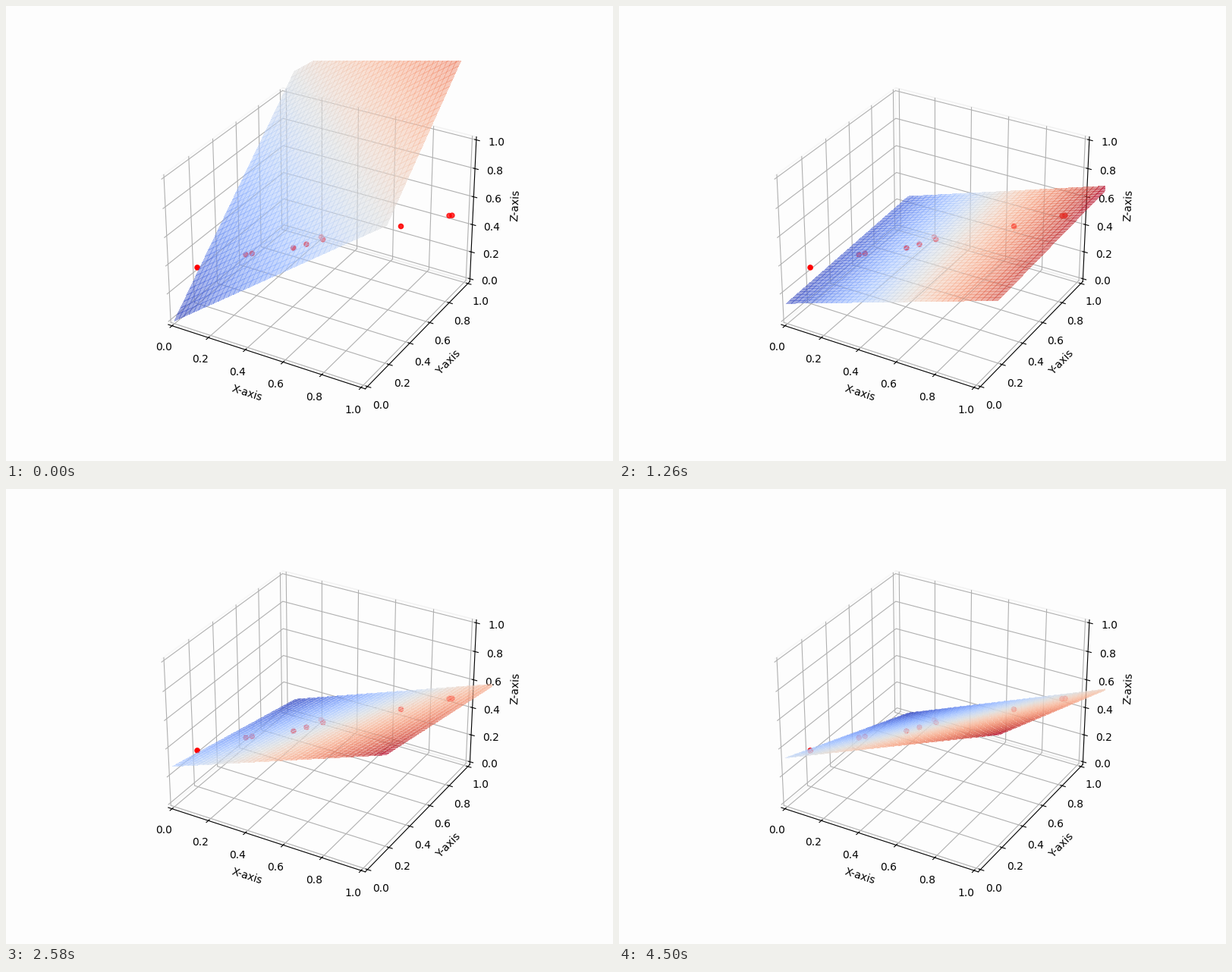
Recreate the animation shown at these times as a matplotlib script. Size 800 by 600 pixels, loop 4530 ms.

```python
import numpy as np
import matplotlib.pyplot as plt
from matplotlib.animation import FuncAnimation
from mpl_toolkits.mplot3d.art3d import Poly3DCollection

FRAMES, INTERVAL = 151, 30
BACKGROUND = "#fdfdfd"
MARGIN = 1 / 48
CELLS = 40
EXTENT = 1.1
ALPHA = 0.5

# Plane coefficients (a, b, c) in z = a*x + b*y + c.
START = np.array([1, 1, 0])
FITTED = np.array([0.584, -0.457, 0.361])
SLOW = np.array([-0.48, 0.942, -0.34])
MEDIUM = np.array([0.76, 0.25, -0.52])
FAST = START - FITTED - SLOW - MEDIUM


def height(x, y, coefs):
    a, b, c = coefs
    return a * x + b * y + c


def plane(step):
    """Gradient descent towards the fit, as three decaying modes."""
    return (FITTED + SLOW * np.exp(-0.0165 * step)
            + MEDIUM * np.exp(-0.05 * step) + FAST * 0.45 ** step)


def grid_cells():
    """Corner x and y of every cell, each of shape (cells, 4)."""
    edges = np.linspace(0, EXTENT, CELLS + 1)
    x, y = np.meshgrid(edges, edges)

    def corners(g):
        quads = (g[:-1, :-1], g[:-1, 1:], g[1:, 1:], g[1:, :-1])
        return np.stack([q.ravel() for q in quads], axis=1)

    return corners(x), corners(y)


cell_x, cell_y = grid_cells()
coolwarm = plt.get_cmap("coolwarm")

fig = plt.figure(figsize=(8, 6), dpi=100, facecolor=BACKGROUND)
ax = fig.add_subplot(projection="3d", computed_zorder=False,
                     facecolor=BACKGROUND)
limits = (-MARGIN, 1 + MARGIN)
ax.set(xlim=limits, ylim=limits, zlim=limits,
       xlabel="X-axis", ylabel="Y-axis", zlabel="Z-axis")
for axis in (ax.xaxis, ax.yaxis, ax.zaxis):
    axis.pane.fill = False

# Data points follow a plane slightly steeper than the fitted one.
px, py = np.array([
    (0.117, 0.033), (0.141, 0.406), (0.164, 0.424), (0.447, 0.333),
    (0.443, 0.456), (0.440, 0.615), (0.295, 0.849), (0.828, 0.659),
    (0.965, 0.880), (0.987, 0.865),
]).T
ax.scatter(px, py, height(px, py, (0.606, -0.457, 0.353)),
           color="red", zorder=1)

# Fully clear edges keep neighbouring cells from overlapping.
surface = Poly3DCollection([np.zeros((4, 3))], facecolors="white",
                           edgecolors=(0, 0, 0, 0), linewidth=0,
                           antialiased=False, zorder=2)
ax.add_collection3d(surface)


def draw(step):
    z = height(cell_x, cell_y, plane(step))
    level = z.mean(axis=1)
    shade = (level - level.min()) / np.ptp(level)
    surface.set_verts(list(np.stack([cell_x, cell_y, z], axis=2)))
    surface.set_facecolor(coolwarm(shade, alpha=ALPHA))
    return (surface,)


anim = FuncAnimation(fig, draw, frames=FRAMES, interval=INTERVAL,
                     repeat=True, repeat_delay=0, cache_frame_data=False)
plt.show()
```
